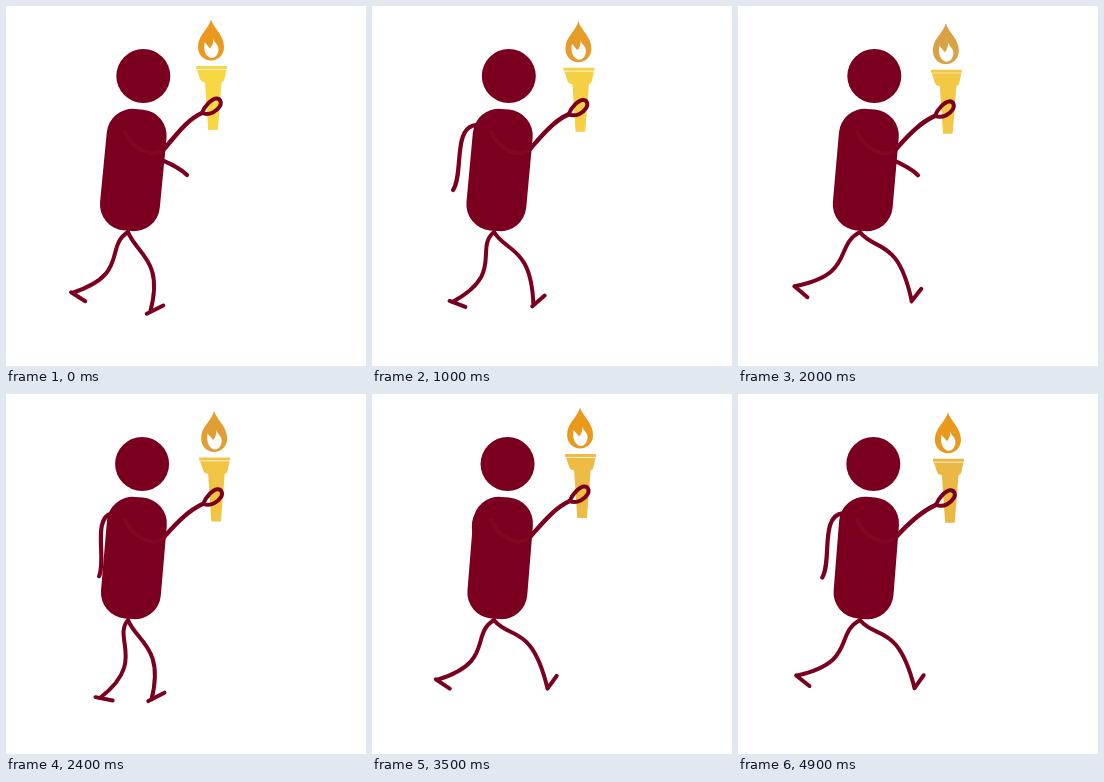
Write an HTML page with a canvas that moves like this. It is 360 px wide and 360 px high and loops after 5 s.

```html
<!DOCTYPE html>
<html lang="en">
<head>
<meta charset="utf-8">
<title>Torch walker</title>
<style>
html, body { margin: 0; width: 100%; height: 100%; overflow: hidden; background: #fff; }
canvas { display: block; }
</style>
</head>
<body>
<canvas id="stage" width="360" height="360"></canvas>
<script>
const ctx = document.getElementById('stage').getContext('2d');
const LOOP = 5, STEP = 0.1, TAU = Math.PI * 2;
const MAROON = '#7b001f';
const HIP = [122, 226];

// The walk has an uneven pace: [seconds, strides walked].
const PACE = [[0, 0.5], [1, 2], [1.5, 2.5], [2.4, 3.89], [3, 4.5], [4, 5.77], [4.9, 7.22], [5, 7.36]];

// Each leg is a curve: two control points, heel and toe, legs together and apart.
const REAR = {
  closed: [[108, 245], [145, 268], [95, 307], [113, 309]],
  wide: [[95, 240], [118, 268], [56, 280], [69, 291]]
};
const FRONT = {
  closed: [[126, 248], [158, 266], [124, 314], [144, 308]],
  wide: [[138, 246], [160, 228], [177, 294], [186, 281]]
};
const ARM = {
  back: [[105, 119], [80, 120], [92, 168], [81, 184]],
  ahead: [[112, 122], [130, 152], [163, 151], [181, 169]]
};

const mix = (a, b, k) => Array.isArray(a) ? a.map((v, i) => mix(v, b[i], k)) : a + (b - a) * k;
const wave = cycles => 0.5 + 0.5 * Math.cos(TAU * cycles);
const rgb = c => `rgb(${c.map(Math.round).join(',')})`;

function strides(t) {
  const i = PACE.findIndex(([end]) => end > t);
  const [t0, a] = PACE[i - 1], [t1, b] = PACE[i];
  return mix(a, b, (t - t0) / (t1 - t0));
}

function stroke(d, width, color = MAROON) {
  ctx.lineWidth = width;
  ctx.strokeStyle = color;
  ctx.stroke(new Path2D(d));
}

function fill(d, color) {
  ctx.fillStyle = color;
  ctx.fill(new Path2D(d));
}

function leg({ closed, wide }, open) {
  const [c1, c2, heel, toe] = mix(closed, wide, open);
  const ankle = mix(heel, toe, 0.3 * (1 - open));
  stroke(`M${HIP}C${c1} ${c2} ${ankle}M${heel}L${toe}`, 4);
}

function torch(t, drift) {
  const dim = Math.exp(-(((t - 1.8) / 0.7) ** 2));
  fill('M205 13.5C208 23 218 29 218 41C218 49 212 54.5 205 54.5C198 54.5 192 49 192 41C192 29 202 24 205 13.5Z',
    rgb(mix([235, 153, 29], [215, 163, 72], dim)));
  fill('M207 32C208 37 213 38 212.5 44C212 49 209 52 205.5 52C200 51 197 45 198.5 36L204 42.5Q208 38 207 32Z', '#fff');
  fill('M190 60H221V63H190ZM191 63.7H220.5L218.5 73Q218 76 215.5 76.5L211.8 124H202.2L199 76.5Q195 76 194 73Z',
    rgb(mix([248, 215, 68], [236, 184, 68], drift)));
}

function draw(t) {
  const drift = Math.min(t / 4, 1);
  const bob = (1 - wave(1.14 * t)) ** 0.6;
  const walk = strides(t) - 0.25;

  ctx.fillStyle = '#fff';
  ctx.fillRect(0, 0, 360, 360);
  ctx.lineCap = ctx.lineJoin = 'round';

  // The front leg runs slightly ahead of the rear one.
  leg(REAR, wave(walk - 0.06) ** 0.7);
  leg(FRONT, wave(walk + 0.06));

  const [a, b, c, d] = mix(ARM.back, ARM.ahead, wave(1.515 * t) ** 1.2);
  stroke(`M${a}C${b} ${c} ${d}`, 4.2);

  ctx.fillStyle = MAROON;
  ctx.beginPath();
  ctx.arc(137.3 - 2 * drift, 70, 27, 0, TAU);
  ctx.fill();

  ctx.save();
  ctx.translate(127.3 + drift, 164);
  ctx.rotate((5.5 - drift) * Math.PI / 180);
  ctx.beginPath();
  ctx.roundRect(-30, -61, 60, 122, 26);
  ctx.fill();
  ctx.restore();
  stroke('M119 126C126 142 147 155 159 142', 4, '#810722');

  ctx.save();
  ctx.translate(1.5 * bob + 3.5 * drift, 5 * bob);
  torch(t, drift);
  ctx.restore();

  const hand = [2 * drift, 4 * bob];
  const wrist = [196 + hand[0], 107 + hand[1]];
  stroke(`M158 143C168 132 ${wrist[0] - 16} ${wrist[1] + 7} ${wrist}`, 4.5);
  ctx.save();
  ctx.translate(...hand);
  stroke('M196 107C199 99 206 93 210 92.5C214 92 216 96 214 100C211 105 204 110 196 107Z', 4);
  ctx.restore();
}

function tick() {
  const t = performance.now() / 1000 % LOOP;
  draw(Math.floor(t / STEP) * STEP);
  requestAnimationFrame(tick);
}
tick();
</script>
</body>
</html>
```
